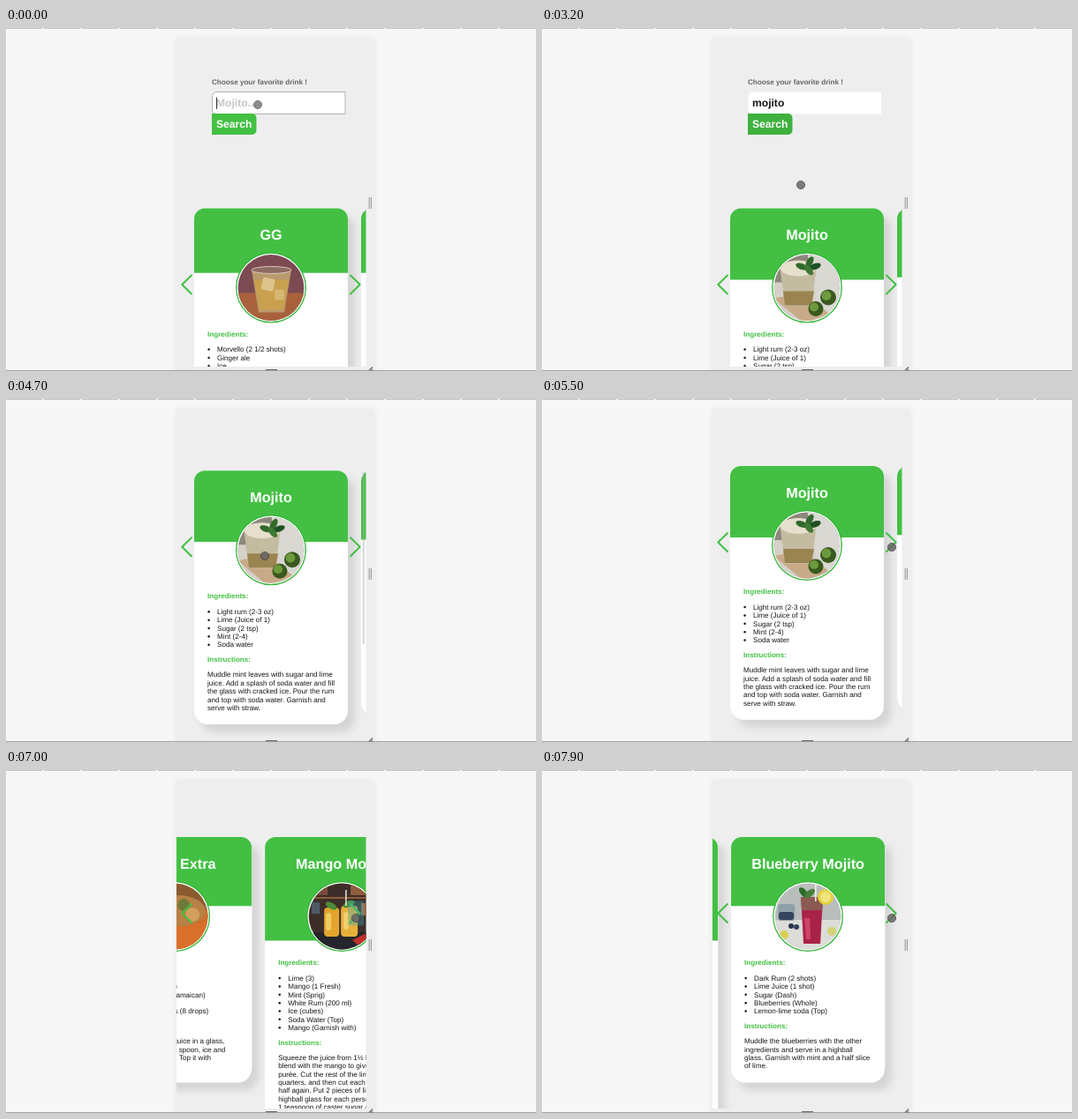
An HTML page that plays this animation: 600x389 px, repeating every 8000 ms.

```html
<!DOCTYPE html>
<html lang="en">
<head>
<meta charset="utf-8">
<title>Drink search</title>
<style>
  html, body { margin: 0; width: 100%; height: 100%; overflow: hidden; background: #f7f7f7; }
  svg { display: block; width: 100vw; height: 100vh; }
  text { font-family: "Liberation Sans", Arial, sans-serif; font-size: 8.1px; fill: #161616; white-space: pre; text-rendering: geometricPrecision; }
  .b { font-weight: bold; }
  .title { font-size: 16.2px; fill: #fff; text-anchor: middle; }
  .head { fill: #43c043; }
  .field { font-size: 12.1px; }
  .arrow { fill: none; stroke: #43c043; stroke-width: 2; stroke-linecap: round; stroke-linejoin: round; }
</style>
</head>
<body>
<svg viewBox="0 0 600 389">
  <defs>
    <clipPath id="screen"><rect x="193" y="12" width="214.5" height="372"/></clipPath>
    <clipPath id="round"><circle r="37.4"/></clipPath>
    <filter id="cardShadow" x="-15%" y="-15%" width="135%" height="135%">
      <feDropShadow dx="8" dy="9" stdDeviation="4.5" flood-color="#000" flood-opacity=".11"/>
    </filter>
    <filter id="panelShadow" x="-10%" y="-10%" width="120%" height="120%">
      <feDropShadow dx="0" dy="0" stdDeviation="3" flood-color="#000" flood-opacity=".08"/>
    </filter>
  </defs>

  <rect width="600" height="389" fill="#f7f7f7"/>
  <path d="M0 .5H600" stroke="#c6c6c6" stroke-dasharray="41 2"/>
  <rect x="193" y="12" width="224" height="380" fill="#eeeeef" filter="url(#panelShadow)"/>

  <g clip-path="url(#screen)">
    <g id="page">
      <text class="b" x="233" y="63.7" style="fill:#666">Choose your favorite drink !</text>
      <path id="input" d="M384 72.5V97.5H238.5a5 5 0 0 1-5-5V77.5a5 5 0 0 1 5-5z" fill="#fff"/>
      <text id="typed" class="b field" x="238" y="89.3"></text>
      <path id="caret" d="M0 78.5V92" stroke="#222" stroke-width=".9"/>
      <path id="button" d="M233 97H278.5a5 5 0 0 1 5 5V116a5 5 0 0 1-5 5H233z"/>
      <text id="label" class="b field" x="238" y="113.3">Search</text>
      <path id="ring" d="M233.5 97.5H278.5a5 5 0 0 1 5 5V116a5 5 0 0 1-5 5H233.5z" fill="none" stroke="#1f4f78" stroke-dasharray="1.5 1.5"/>
      <g id="first"></g>
      <g id="results"></g>
      <path class="arrow" d="M210 280.5L199.3 291L210 301.5"/>
      <path class="arrow" d="M390 280.5L400.7 291L390 301.5"/>
      <rect id="tap" x="387" y="277" width="18" height="28" fill="#3aa8b8" opacity=".35"/>
    </g>
    <rect id="thumb" x="403.8" width="2" height="196" rx="1" fill="#aaa" opacity=".5"/>
  </g>

  <path d="M411.2 192V205M413.4 192V205" stroke="#888" stroke-width=".9"/>
  <path d="M0 388.5H600" stroke="#a2a2a2"/>
  <path d="M294 387.5H307M411 388.5L415 384.5M413.5 388.5L415 387" stroke="#666" stroke-width="1.1"/>
  <circle id="cursor" r="4.6" fill="#666" stroke="#3a3a3a" stroke-width=".8"/>
</svg>

<script>
const LOOP = 8000, TICK = 100;
const CARD = { x: 213, y: 205, w: 174, step: 189, line: 9.35 };
const $ = id => document.getElementById(id);

const rect = (x, y, w, h, fill, more = '') =>
  `<rect x="${x}" y="${y}" width="${w}" height="${h}" fill="${fill}" ${more}/>`;
const disc = (x, y, r, fill) => `<circle cx="${x}" cy="${y}" r="${r}" fill="${fill}"/>`;
const shape = (d, fill, more = '') => `<path d="${d}" fill="${fill}" ${more}/>`;
const text = (x, y, s, cls = '') => `<text class="${cls}" x="${x}" y="${y}">${s}</text>`;
const backdrop = (top, bottom, y) => rect(-40, -40, 80, 80, top) + rect(-40, y, 80, 60, bottom);
const leaf = (x, y, turn, fill = '#2f6a2c') =>
  `<ellipse cx="${x}" cy="${y}" rx="7" ry="3.5" fill="${fill}" transform="rotate(${turn} ${x} ${y})"/>`;
const lime = (x, y, r) => disc(x, y, r, '#39591f') + disc(x - 2, y - 2, r * .6, '#6d9a3c');

// Simplified pictures, centred on 0,0
const photos = {
  ginger: backdrop('#7b4a52', '#a9613c', 6) +
    shape('M-22-20H23L15 28H-14z', '#b99a6c') +
    shape('M-19-9H20L14 25H-13z', '#c9a04e') +
    rect(-11, -10, 14, 14, '#dcc48c', 'rx="2" transform="rotate(12)"') +
    rect(4, 2, 11, 12, '#d5b672', 'rx="2"') +
    '<ellipse cx=".5" cy="-20" rx="22.5" ry="4" fill="#8d6a62" stroke="#d9c9b8"/>',
  mojito: backdrop('#8b877c', '#d5d0c8', -6) +
    shape('M0-40H40V40H16z', '#d9d8d3') +
    shape('M-38 12L-4 6L26 30L-4 40z', '#c8aa88') +
    shape('M-31-25H11L5 21H-25z', '#c4bca0') +
    shape('M-27 4H8L5 20H-25z', '#9a8450') +
    '<ellipse cx="-10" cy="-22" rx="20" ry="9" fill="#e6dfcc"/>' +
    leaf(-6, -24, 20) + leaf(3, -29, -60) + leaf(9, -24, -20, '#1f5123') + leaf(2, -20, 50, '#3f7a34') +
    lime(10, 24, 8.5) + lime(24, 11, 9),
  extra: backdrop('#8a5a30', '#cf6d2a', -8) +
    '<ellipse cx="2" cy="-6" rx="33" ry="18" fill="#b98045"/>' +
    disc(-12, -10, 8, '#d0a76a') + disc(10, -13, 7, '#6d7b3a') + disc(20, -2, 8, '#d3a05b') +
    shape('M-40 2Q0 20 40 4V40H-40z', '#d9702a') + disc(-14, 18, 8, '#e58a3e'),
  mango: backdrop('#3d2e2a', '#25262b', 18) +
    rect(-40, -22, 80, 2, '#8d5b38') + rect(-32, -34, 16, 10, '#7a4b3a') + rect(10, -36, 22, 12, '#915d3c') +
    rect(-34, -16, 9, 13, '#4d5a66') + rect(22, -15, 12, 14, '#a06a45') +
    rect(-20, -10, 17, 33, '#e3a52c', 'rx="4"') + rect(-1, -12, 19, 35, '#e8b03a', 'rx="4"') +
    rect(-18, -4, 6, 20, '#f0cd62', 'rx="3"') + rect(2, -5, 6, 20, '#f2d06a', 'rx="3"') +
    leaf(-12, -12, 30, '#4d8b35') + leaf(8, -14, -25, '#4d8b35') +
    rect(4, -30, 1.5, 18, '#e9e2d2') + shape('M12 27L30 18V27L20 34z', '#c22f28'),
  berry: backdrop('#b9bdbc', '#dcdcd8', 4) +
    rect(-34, -14, 19, 19, '#8ea0a8', 'rx="3"') + rect(-33, -5, 17, 9, '#34445f', 'rx="3"') +
    disc(-19, 11, 3, '#27314a') + disc(-13, 12, 3, '#33405c') + disc(-27, 21, 5, '#d9cf4f') + disc(27, 17, 5, '#d6d276') +
    shape('M-8-22H17L14 31H-5z', '#a92348') + shape('M-8-22H17L16-7H-7z', '#8b5a52') +
    shape('M-4 2H2L3 26H-2z', '#cf4468') + disc(20, -22, 9, '#e3d23c') + disc(20, -22, 6, '#efe57c') +
    leaf(-5, -27, 50) + leaf(2, -26, -40, '#47803a') + rect(8, -37, 1.5, 20, '#f0f0ee')
};

function card(index, { title = '', photo, items = [], steps = [], h }) {
  const { x, y, w, step, line } = CARD;
  const listY = 162.4, headY = listY + (items.length - 1) * line + 17, textY = headY + 17;
  const height = h || textY + (steps.length - 1) * line + 16;
  const green = height * .28;
  const top = `V11.5a12 12 0 0 1 12-12H${w - 12}a12 12 0 0 1 12 12V`;
  let out = `<g transform="translate(${x + index * step} ${y})">` +
    shape(`M0 ${height - 16}${top}${height - 16}a16 16 0 0 1-16 16H16a16 16 0 0 1-16-16z`, '#fff', 'filter="url(#cardShadow)"') +
    shape(`M0 ${green}${top}${green}z`, '#43c043');
  if (photo) {
    out += text(w / 2, 35, title, 'b title') +
      `<g transform="translate(${w / 2} 89.5)">` + disc(0, 0, 40, '#35b53a') + disc(0, 0, 38.7, '#fff') +
      `<g clip-path="url(#round)">${photos[photo]}</g></g>` +
      text(15, 144.7, 'Ingredients:', 'b head') +
      items.map((s, i) => disc(16.6, listY + i * line - 2.8, 1.25, '#161616') + text(26, listY + i * line, s)).join('') +
      text(15, headY, 'Instructions:', 'b head') +
      steps.map((s, i) => text(15, textY + i * line, s)).join('');
  }
  return out + '</g>';
}

const firstCards = [
  { title: 'GG', photo: 'ginger', h: 260,
    items: ['Morvello (2 1/2 shots)', 'Ginger ale', 'Ice'] },
  { h: 260 }
];
const resultCards = [
  { title: 'Mojito', photo: 'mojito',
    items: ['Light rum (2-3 oz)', 'Lime (Juice of 1)', 'Sugar (2 tsp)', 'Mint (2-4)', 'Soda water'],
    steps: ['Muddle mint leaves with sugar and lime', 'juice. Add a splash of soda water and fill',
      'the glass with cracked ice. Pour the rum', 'and top with soda water. Garnish and', 'serve with straw.'] },
  { title: 'Mojito Extra', photo: 'extra',
    items: ['Mint (1/2 handful)', 'Lemon juice (3 cl)', 'Dark rum (1/8 L Jamaican)', 'Club soda (1/8 L)', 'Tarembosa bitters (8 drops)'],
    steps: ['Put mint with lemon juice in a glass,', 'mash the mint with a spoon, ice and',
      'fill up with club soda. Top it with', 'Tarembosa.'] },
  { title: 'Mango Mojito', photo: 'mango', h: 418,
    items: ['Lime (3)', 'Mango (1 Fresh)', 'Mint (Sprig)', 'White Rum (200 ml)', 'Ice (cubes)', 'Soda Water (Top)', 'Mango (Garnish with)'],
    steps: ['Squeeze the juice from 1½ limes and', 'blend with the mango to give a smooth',
      'purée. Cut the rest of the limes into', 'quarters, and then cut each wedge in',
      'half again. Put 2 pieces of lime in a', 'highball glass for each person and add',
      '1 teaspoon of caster sugar and 5-6 mint'] },
  { title: 'Blueberry Mojito', photo: 'berry',
    items: ['Dark Rum (2 shots)', 'Lime Juice (1 shot)', 'Sugar (Dash)', 'Blueberries (Whole)', 'Lemon-lime soda (Top)'],
    steps: ['Muddle the blueberries with the other', 'ingredients and serve in a highball',
      'glass. Garnish with mint and a half slice', 'of lime.'] }
];
$('first').innerHTML = firstCards.map((c, i) => card(i, c)).join('');
$('results').innerHTML = resultCards.map((c, i) => card(i, c)).join('');

const keyTimes = [300, 400, 600, 700, 1100, 1200];
const slides = [6200, 6900, 7630];
const scrollKeys = [[3200, 0], [3800, 62], [4000, 64], [4100, 70], [4300, 94], [4500, 114], [4700, 123.3], [4900, 128.5]];
const cursorX = [[1500, 285], [1700, 273], [2400, 273], [2700, 287], [2900, 288], [3100, 293], [4800, 293], [5300, 396]];
const cursorY = [[1500, 87], [1700, 108], [2400, 108], [2700, 114], [2900, 140], [3100, 178], [4800, 178], [5300, 168]];

function along(keys, t) {
  if (t <= keys[0][0]) return keys[0][1];
  for (let i = 1; i < keys.length; i++) {
    const [t0, v0] = keys[i - 1], [t1, v1] = keys[i];
    if (t < t1) return v0 + (v1 - v0) * (t - t0) / (t1 - t0);
  }
  return keys[keys.length - 1][1];
}

// CSS "ease": cubic-bezier(.25, .1, .25, 1)
function ease(x) {
  if (x <= 0) return 0;
  if (x >= 1) return 1;
  const bez = (s, a, b) => 3 * (1 - s) * (1 - s) * s * a + 3 * (1 - s) * s * s * b + s * s * s;
  let lo = 0, hi = 1;
  for (let i = 0; i < 24; i++) {
    const mid = (lo + hi) / 2;
    if (bez(mid, .25, .25) < x) lo = mid; else hi = mid;
  }
  return bez(lo, .1, 1);
}

const set = (id, attrs) => { for (const k in attrs) $(id).setAttribute(k, attrs[k]); };
const show = (id, on) => set(id, { display: on ? 'inline' : 'none' });

function render(t) {
  const count = keyTimes.filter(k => t >= k).length;
  const focused = t < 1800, pressed = t >= 1800 && t < 2300;
  $('typed').textContent = count ? 'mojito'.slice(0, count) : 'Mojito...';
  $('typed').style.fill = count ? '#161616' : '#c6c6c6';
  set('input', { stroke: focused ? '#b0b0b0' : 'none' });
  const caretX = 238.5 + (count ? $('typed').getComputedTextLength() : 0);
  set('caret', { transform: `translate(${caretX} 0)` });
  show('caret', focused);

  set('button', { fill: pressed ? '#38ad68' : t < 1700 ? '#43c043' : '#3fb13f' });
  $('label').style.fill = pressed ? '#a3d3e4' : '#fff';
  show('ring', pressed);

  show('first', t < 1900);
  show('results', t >= 2400);
  const pos = slides.reduce((sum, s) => sum + ease((t - s) / 300), 0);
  set('results', { transform: `translate(${-pos * CARD.step} 0)` });
  show('tap', slides.some(s => t >= s && t < s + 200));

  const scroll = along(scrollKeys, t);
  set('page', { transform: `translate(0 ${-scroll})` });
  set('thumb', { y: 12 + scroll * .57 });
  show('thumb', t > 3200 && t < 5400);

  set('cursor', { cx: along(cursorX, t), cy: along(cursorY, t), opacity: t < 300 ? .75 : .85 });
  show('cursor', t < 300 || t >= 1500);
}

const start = performance.now();
function loop(now) {
  const ms = Math.max(0, now - start) % LOOP;
  render(Math.floor(ms / TICK) * TICK);
  requestAnimationFrame(loop);
}
render(0);
requestAnimationFrame(loop);
</script>
</body>
</html>
```
